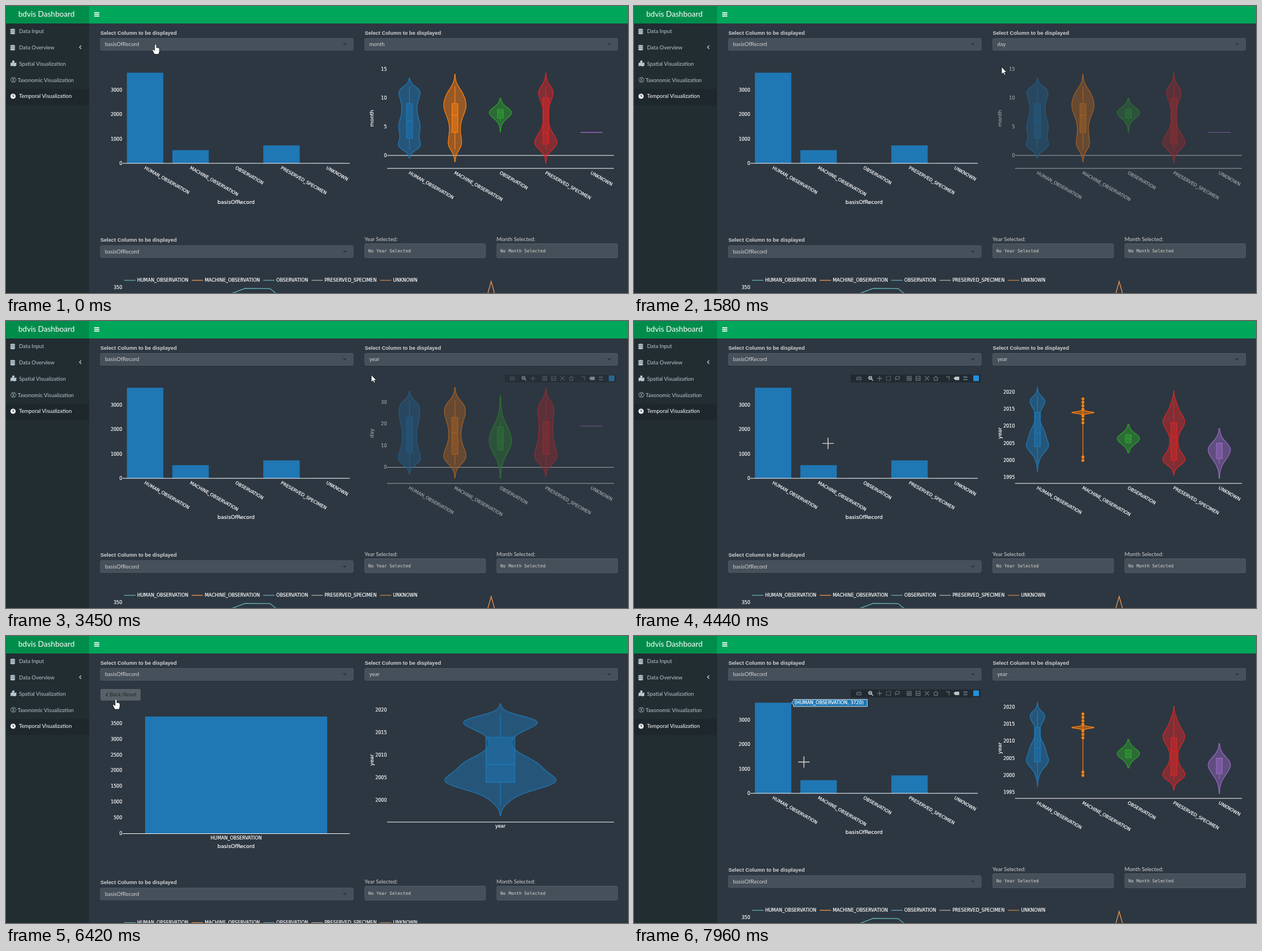
An HTML page for the animation above (8 s loop, 1100x509 px).

```html
<!DOCTYPE html>
<html lang="en">
<head>
<meta charset="utf-8">
<title>bdvis Dashboard</title>
<style>
html, body { margin: 0; width: 100%; height: 100%; overflow: hidden; background: #2d3741; }
svg { display: block; width: 100vw; height: 100vh; }
text { white-space: pre; }
.ui { font: 9.5px Lato, sans-serif; fill: #d2d2d2; }
.side { font: 9.5px Lato, sans-serif; fill: #b8c7ce; }
.brand { font: 13.6px Lato, sans-serif; fill: #fff; }
.label { font: bold 9.3px "Liberation Sans", sans-serif; fill: #d2d2d2; }
.mono { font: 7.8px "DejaVu Sans Mono", monospace; fill: #d8d8cf; }
.plot { font: 8px "DejaVu Sans", sans-serif; }
.axis { font: 9.2px "DejaVu Sans", sans-serif; }
.plot, .axis { fill: #fff; stroke: #fff; stroke-width: .2; }
.mid { text-anchor: middle; }
.end { text-anchor: end; }
#menu { filter: drop-shadow(0 4px 4px rgba(0,0,0,.35)); }
</style>
</head>
<body>
<svg id="stage" viewBox="0 0 1100 509"></svg>
<script>
const LOOP = 8000;
const BLUE = '#1f77b4', ORANGE = '#ff7f0e', GREEN = '#2ca02c', RED = '#d62728', PURPLE = '#9467bd';
const FIELD = '#46505a', DARK = '#2b343c';
const CATEGORIES = ['HUMAN_OBSERVATION', 'MACHINE_OBSERVATION', 'OBSERVATION', 'PRESERVED_SPECIMEN', 'UNKNOWN'];
const PITCH = 80.4;
const SIZES = { ui: 9.5, side: 9.5, brand: 13.6, label: 9.3, mono: 7.8, plot: 8, axis: 9.2 };

// Markup helpers; text is placed by its vertical centre.
const rect = (x, y, w, h, fill, extra = '') => `<rect x="${x}" y="${y}" width="${w}" height="${h}" fill="${fill}" ${extra}/>`;
const path = (d, fill, extra = '') => `<path d="${d}" fill="${fill}" ${extra}/>`;
const stroke = (d, color = '#fff', width = 1, extra = '') =>
  path(d, 'none', `stroke="${color}" stroke-width="${width}" ${extra}`);
const hline = (x1, x2, y, color, width) => stroke(`M${x1} ${y}H${x2}`, color, width);
const text = (x, y, s, cls, extra = '') =>
  `<text x="${x}" y="${y + SIZES[cls.split(' ')[0]] * .36}" class="${cls}" ${extra}>${s}</text>`;
const group = (id, body) => `<g id="${id}">${body}</g>`;
const each = (count, fn) => Array.from({ length: count }, (_, i) => fn(i)).join('');

// Axes
const scale = (y0, unit, origin = 0) => v => y0 - (v - origin) * unit;
const ticks = (x, y, first, step, count) => each(count, i =>
  text(x, y(first + step * i), first + step * i, 'plot end'));
const slanted = (x, y) => CATEGORIES.map((name, i) =>
  `<text class="plot" transform="translate(${x + PITCH * i - 2} ${y}) rotate(30)">${name}</text>`).join('');
const sideTitle = (name, y) => `<text class="axis mid" transform="translate(650 ${y}) rotate(-90)">${name}</text>`;

// Density: an even spread over the data span, blurred at its ends, with a few bumps on top.
function density(v, { span: [min, max], blur, base = 1, peaks = [] }) {
  const edge = d => 1 / (1 + Math.exp(-1.7 * d / blur));
  const bumps = peaks.reduce((sum, [p, w]) => sum + w * Math.exp(-(((v - p) / blur / 1.5) ** 2) / 2), base);
  return edge(v - min) * edge(max - v) * bumps;
}

function violin(cx, color, y, data, half = 19.7) {
  const { span: [min, max], blur, box } = data, steps = 60;
  const values = Array.from({ length: steps + 1 }, (_, i) => min - 2 * blur + (max - min + 4 * blur) * i / steps);
  const widths = values.map(v => density(v, data)), widest = Math.max(...widths);
  const side = sign => values.map((v, i) => `${cx + sign * half * widths[i] / widest} ${y(v)}`);
  const style = `fill-opacity=".5" stroke="${color}" stroke-width="1.3"`;
  const body = path(`M${[...side(1), ...side(-1).reverse()].join('L')}Z`, color, style);
  if (!box) return body;
  const [q1, median, q3] = box.map(y), w = half * .26;
  return body + stroke(`M${cx} ${y(max)}V${q3}M${cx} ${q1}V${y(min)}`, color, 1.3)
    + rect(cx - w, q3, 2 * w, q1 - q3, color, style) + hline(cx - w, cx + w, median, color, 1.3);
}

const centre = i => 713.5 + PITCH * i;
const violins = (y, rows) => rows.map(([color, data], i) => data ? violin(centre(i), color, y, data) : '').join('');
const frameOf = name => sideTitle(name, 199) + slanted(713.5, 297.5) + hline(674, 1075, 288);
const single = y => hline(1016, 1055, y, PURPLE, 1.4);

const monthY = scale(265, 10.2);
const monthChart = frameOf('month') + hline(674, 1075, monthY(0)) + ticks(673.5, monthY, 0, 5, 4)
  + violins(monthY, [
    [BLUE, { span: [1, 12], blur: .72, base: .8, peaks: [[11.5, .3], [8, -.1], [5, .2], [1, .5]], box: [3, 6, 9] }],
    [ORANGE, { span: [1, 12], blur: 1.05, base: .5, peaks: [[11, .2], [8.5, .55], [1, .35]], box: [4, 7, 9] }],
    [GREEN, { span: [6, 8], blur: .97, base: .3, peaks: [[8.4, 1]], box: [6.5, 7.5, 8] }],
    [RED, { span: [1, 12], blur: 1.18, base: .22, peaks: [[11.8, .85], [1.6, 1.3]], box: [2, 4, 10] }]
  ]) + single(monthY(4));

const dayY = scale(259.5, 3.85);
const dayChart = frameOf('day') + hline(674, 1075, dayY(0)) + ticks(673.5, dayY, 0, 10, 4)
  + violins(dayY, [
    [BLUE, { span: [1, 31], blur: 2, base: .7, peaks: [[29, .3], [23, .25], [6, .2], [2, .4]], box: [7, 15, 23] }],
    [ORANGE, { span: [1, 31], blur: 2.9, base: .5, peaks: [[30, .3], [25, .3], [4, .6]], box: [6, 16, 23] }],
    [GREEN, { span: [7, 21], blur: 6, base: .4, peaks: [[9, .8]], box: [8, 12, 18.7] }],
    [RED, { span: [1, 31], blur: 2.6, base: .65, peaks: [[28, .2], [11, .1], [4, .5]], box: [6, 13, 21] }]
  ]) + single(dayY(19));

const humanYears = { span: [1999, 2019], blur: 1.2, base: .2, peaks: [[2017.7, .62], [2008, .48], [2004.2, .85]], box: [2004, 2008, 2014] };
const yearY = scale(277.5, 6.06, 1995);
const outliers = [2000, 2001, 2011, 2012, 2013, 2015, 2016, 2017, 2018].map(v =>
  `<circle cx="${centre(1)}" cy="${yearY(v)}" r="2.6" fill="${ORANGE}"/>`).join('');
const yearChart = frameOf('year') + ticks(673.5, yearY, 1995, 5, 6)
  + violins(yearY, [
    [BLUE, humanYears],
    [ORANGE, { span: [2014, 2014], blur: .3 }],
    [GREEN, { span: [2005.2, 2007.5], blur: 1.5, box: [2005.2, 2006.3, 2007.5] }],
    [RED, { span: [1998.5, 2017.5], blur: 1.4, base: .35, peaks: [[2011.3, .65], [1999.5, .85]], box: [2000, 2007, 2011] }],
    [PURPLE, { span: [1999, 2005], blur: 2.15, base: .5, peaks: [[2005, .8]], box: [2000.5, 2005, 2005] }]
  ]) + stroke(`M${centre(1)} ${yearY(2018)}V${yearY(2000)}`, ORANGE, 1.3) + outliers;

const singleY = scale(291.5, 8, 2000);
const singleChart = sideTitle('year', 220) + ticks(673.5, singleY, 2000, 5, 5) + hline(674, 1075, 330)
  + text(centre(2), 337, 'year', 'plot mid') + violin(centre(2), BLUE, singleY, humanYears, 98.5);

const countY = scale(279, .0432);
const barChart = [3720, 540, 10, 735, 10].map((v, i) =>
  rect(213.8 + PITCH * i, countY(v), 64.4, 279 - countY(v), BLUE)).join('')
  + hline(206, 608, 279) + ticks(205.5, countY, 0, 1000, 4)
  + slanted(246, 288.5) + text(407, 347.5, 'basisOfRecord', 'axis mid');
const singleCountY = scale(350, .0557);
const singleBar = rect(246, singleCountY(3720), 322, 350 - singleCountY(3720), BLUE) + hline(206, 608, 350.5)
  + ticks(205.5, singleCountY, 0, 500, 8)
  + text(407, 358, CATEGORIES[0], 'plot mid') + text(407, 373, 'basisOfRecord', 'axis mid');

const hoverLabel = path('M278.5 118.5L282 115V112.5H412.5V125H282V122Z', BLUE, 'stroke="#fff" stroke-width=".8"')
  + text(284, 118.5, '(HUMAN_OBSERVATION, 3720)', 'plot');

// Toolbar: glyphs around their own centre, laid out from the right end.
const SQUARE = 'M-4-4H4V4H-4Z';
const GLYPHS = {
  camera: 'M-4-2H4V3H-4ZM-1-3H1M-1 .5H1',
  zoom: 'M-4-1a3 3 0 1 0 6 0a3 3 0 1 0-6 0M1.5 1.5L4.5 4.5M-2.5-1H.5',
  pan: 'M-5 0H5M0-5V5',
  select: SQUARE,
  lasso: 'M-3 4Q-6-4 0-4T4 0Q2 3-3 1',
  plus: SQUARE + 'M-4 0H4M0-4V4',
  minus: SQUARE + 'M-4 0H4',
  fit: 'M-4-4L4 4M4-4L-4 4',
  home: 'M-4.5 0L0-4 4.5 0M-3 0V4H3V0',
  spike: 'M-3-3H3V4',
  closest: 'M-4 0L-2-2H4V2H-2ZM-3 0H4',
  compare: 'M-4-2.4H4M-4 2.4H4'
};
function modebar(left, right, tools) {
  let x = right - 6;
  const icons = tools.split(' ').reverse().map(name => {
    x -= name === '|' ? 5.2 : 15.7;
    if (name === '|') return '';
    const color = name === 'zoom' || name === 'closest' ? '#c3c7ca' : '#626b72';
    const dash = name === 'select' ? 'stroke-dasharray="2 1.2"' : '';
    return stroke(GLYPHS[name], color, name === 'closest' || name === 'compare' ? 2.6 : 1.6,
      `${dash} transform="translate(${x} 101.7) scale(.9)"`);
  });
  return rect(left, 95, right - left, 14, '#222a31') + icons.join('') + rect(right - 13, 96.5, 10, 10, '#2390dc');
}
const COMMON = '| plus minus fit home | spike closest compare |';
const leftBar = modebar(383, 613, 'camera | zoom pan select lasso ' + COMMON);
const rightBar = modebar(882, 1079, 'camera | zoom pan ' + COMMON);

// Form parts
const field = (x, y, w, h) => rect(x + .5, y + .5, w - 1, h - 1, FIELD, 'rx="2" stroke="#505a64"');
const select = (x, y, value, id = '') => text(x + .5, y - 20.5, 'Select Column to be displayed', 'label')
  + field(x, y - 11, 448, 22) + text(x + 8.5, y, value, 'ui', id && `id="${id}"`)
  + path(`M${x + 429} ${y - 1.5}h7l-3.5 3.5Z`, DARK);
const output = (x, name) => text(x, 413.5, `${name} Selected:`, 'ui') + field(x, 421, 214.5, 26)
  + text(x + 6.8, 434.5, `No ${name} Selected`, 'mono');

function sidebar() {
  const color = '#b8c7ce', rowY = i => 45 + 28.75 * i;
  const stack = y => each(3, i =>
    path(`M7.5 ${y - 3.5 + 3 * i}a4.3 1.6 0 0 1 8.6 0v1.2a4.3 1.6 0 0 1-8.6 0Z`, color, 'stroke="#222d32" stroke-width=".5"'));
  const names = ['Data Input', 'Data Overview', 'Spatial Visualization', 'Taxonomic Visualization', 'Temporal Visualization'];
  return rect(0, 31, 147, 478, '#222d32') + rect(0, 147, 147, 29, '#1e282c')
    + names.map((name, i) => text(i === 3 ? 20.5 : 23, rowY(i), name, 'side', i === 4 ? 'style="fill:#fff"' : '')).join('')
    + stack(rowY(0)) + stack(rowY(1))
    + path('M8 101l3-1 4 1 3.3-1v6l-3.3 1-4-1-3 1Z', color) + `<circle cx="13" cy="98.7" r="2.2" fill="${color}"/>`
    + stroke('M10.5 127h5l2.5 4-2.5 4h-5l-2.5-4ZM10.5 127l5 8M15.5 127l-5 8', '#8fa0a8', 1)
    + '<circle cx="12.5" cy="160" r="4.6" fill="#fff"/>' + stroke('M12.5 157v3.2l2 1', '#1e282c', 1.1)
    + stroke('M133 70l-3 3 3 3', color, 1.4);
}

const header = rect(0, 0, 1100, 31, '#00a65a') + rect(0, 0, 147, 31, '#008d4c')
  + text(71.5, 14.5, 'bdvis Dashboard', 'brand mid') + each(3, i => rect(156, 11 + 3 * i, 9, 1.7, '#fff'));

function legend() {
  const pen = document.createElement('canvas').getContext('2d');
  pen.font = '8px "DejaVu Sans", sans-serif';
  let x = 209;
  return ['#5fa8a8', '#e8924f', '#6a9fb0', '#a8a8a0', '#b5804a'].map((color, i) => {
    const item = hline(x, x + 20, 486.5, color, 1.4) + text(x + 23, 486.5, CATEGORIES[i], 'plot');
    x += 29 + pen.measureText(CATEGORIES[i]).width;
    return item;
  }).join('');
}
const lower = select(166.5, 435.5, 'basisOfRecord') + output(634, 'Year') + output(867.5, 'Month')
  + legend() + text(205.5, 499, '350', 'plot end')
  + stroke('M400 509.5L423 500.8 467 501.2 478 510', '#5fa8a8', 1.4)
  + stroke('M852 510L858 488.5 864 510', '#e8924f', 1.4);

const menu = rect(634.5, 82, 447, 57.5, FIELD) + rect(634.5, 85, 447, 17, '#f5f5f5', 'id="highlight"')
  + ['year', 'day', 'month'].map((name, i) => text(643, 93 + 17 * i, name, 'ui', 'style="fill:#2d353c"')).join('');
const openField = rect(635, 58, 446, 21, '#fff', 'rx="2"')
  + text(643, 68, '', 'ui', 'id="placeholder" style="fill:#c4c4c4"') + path('M1063.5 69.5h7l-3.5-3.5Z', '#222');
const backButton = rect(167, 94, 71, 20.5, FIELD, 'rx="2" id="backFace"')
  + stroke('M180 101l-3.2 3.2 3.2 3.2', '#23282c', 1.3) + text(183, 104, 'Back/Reset', 'ui', 'style="fill:#23282c"');

const outline = 'stroke="#111" stroke-width=".8"';
const cursors = group('hand', path('M-1.6 1.5Q0-1 1.6 1.5V6.5Q6.5 5.5 7 9V13L5.5 18H-2L-5.5 11.5Q-6.2 9-4 9.5L-1.6 11.5Z', '#fff', outline))
  + group('arrow', path('M0 0V13L3 10.2 5 14.5 7 13.5 5.2 9.5H9Z', '#fff', outline))
  + group('cross', stroke('M0-10V10M-10 0H10', '#e2dcd6', 1.4));

document.getElementById('stage').innerHTML = rect(0, 0, 1100, 509, '#2d3741') + sidebar() + header
  + select(166.5, 68, 'basisOfRecord') + select(634, 68, 'month', 'chosen')
  + group('left', group('bars', barChart) + group('leftTools', leftBar) + group('tip', hoverLabel) + group('oneBar', singleBar))
  + group('right', group('month', monthChart) + group('day', dayChart) + group('year', yearChart)
    + group('single', singleChart) + group('rightTools', rightBar))
  + group('back', backButton) + group('lower', lower)
  + group('open', openField + group('menu', menu)) + group('cursor', cursors);

// Motion
const el = id => document.getElementById(id);
const show = (id, on) => el(id).setAttribute('display', on ? 'inline' : 'none');
const fade = (id, value) => el(id).setAttribute('opacity', value);
const within = (t, a, b) => t >= a && t < b;
const progress = (t, start, end) => Math.min(1, Math.max(0, (t - start) / (end - start)));
const easeOut = k => k * (2 - k);
const easeInOut = k => k * k * (3 - 2 * k);

// Plots dim while they recalculate: [dimmed from, restored from].
const LEFT_BUSY = [[5090, 5570], [6930, 7740]];
const RIGHT_BUSY = [[1500, 1780], [3370, 3640], [5090, 6000], [6930, 7740]];
const brightness = (t, busy) => 1 - .7 * busy.reduce((sum, [from, to]) =>
  sum + easeOut(progress(t, from, from + 200)) - easeOut(progress(t, to, to + 200)), 0);

// Pointer moves: start, end, x, y.
const MOVES = [
  [140, 500, 655, 64], [640, 900, 648.5, 101.5], [960, 1040, 650, 108], [1780, 2080, 654.5, 79.5],
  [2560, 2680, 654, 70], [2720, 2840, 648, 92], [2920, 3130, 646, 95.5], [3470, 3840, 577, 108],
  [3980, 4490, 337, 220], [4670, 4880, 249, 200], [5640, 6280, 194.5, 112], [6420, 6540, 195, 116],
  [7270, 7720, 300.5, 223.5]
];
const pointer = t => MOVES.reduce(([x, y], [start, end, toX, toY]) => {
  const k = easeInOut(progress(t, start, end));
  return [x + (toX - x) * k, y + (toY - y) * k];
}, [264.5, 67.5]);

function draw(t) {
  const value = t < 1050 ? 'month' : t < 2870 ? 'day' : 'year';
  const chart = t < 1780 ? 'month' : t < 3640 ? 'day' : within(t, 6000, 7760) ? 'single' : 'year';
  const drilled = within(t, 5570, 7760);
  const open = within(t, 620, 1050) || within(t, 2700, 2870);
  const [x, y] = pointer(t);
  const onField = within(y, 57, 82), onButton = drilled && x < 238 && y < 117;
  const kind = open || onField || onButton ? 'hand' : x < 613 && y > 95 ? 'cross' : 'arrow';

  el('chosen').textContent = el('placeholder').textContent = value;
  show('open', open);
  el('highlight').setAttribute('y', y > 104 ? 102 : 85);

  ['month', 'day', 'year', 'single'].forEach(id => show(id, id === chart));
  ['oneBar', 'back'].forEach(id => show(id, drilled));
  ['bars', 'leftTools'].forEach(id => show(id, !drilled));
  show('tip', !drilled && t > 4670 && x < 301);
  el('backFace').setAttribute('fill', t > 6430 ? '#646a6f' : onButton ? '#596168' : FIELD);
  el('lower').setAttribute('transform', `translate(0 ${drilled ? 22 : 0})`);

  fade('left', brightness(t, LEFT_BUSY));
  fade('right', brightness(t, RIGHT_BUSY));
  fade('leftTools', progress(t, 3560, 3800));
  fade('rightTools', progress(t, 2890, 3120) - progress(t, 3500, 3750));

  el('cursor').setAttribute('transform', `translate(${x} ${y})`);
  ['hand', 'arrow', 'cross'].forEach(id => show(id, id === kind));
}

function tick() {
  draw(performance.now() % LOOP);
  requestAnimationFrame(tick);
}
tick();
</script>
</body>
</html>
```
